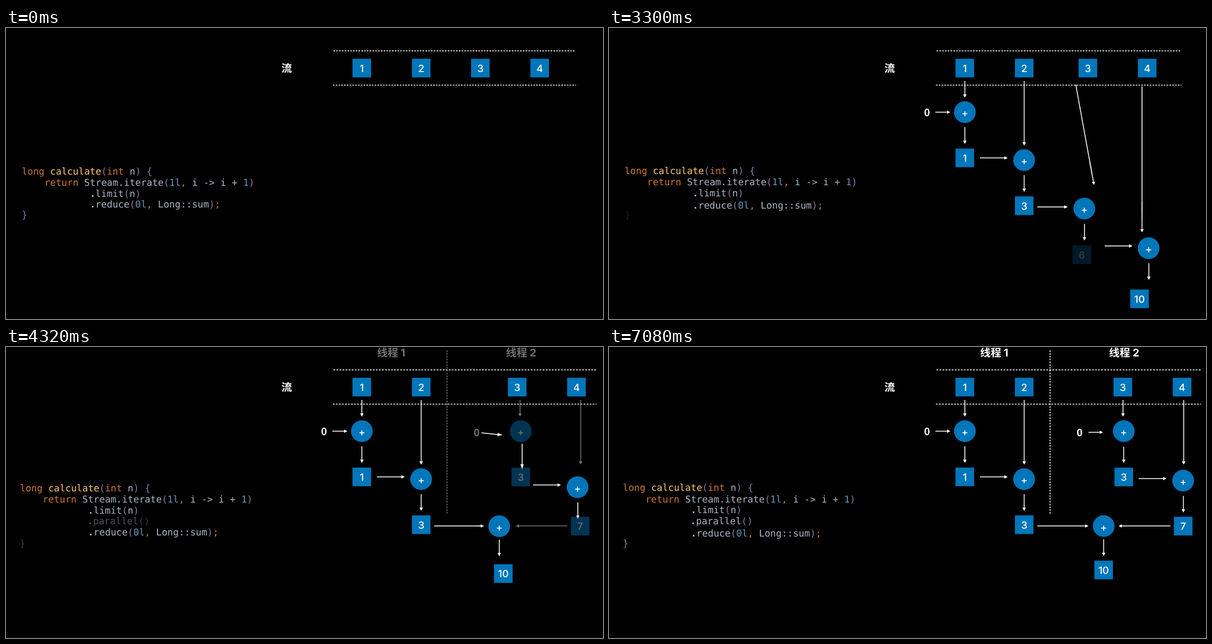
Animation of 1072 by 522 pixels, one loop 7.14 s. Source, as an HTML page:

```html
<!DOCTYPE html>
<html lang="zh">
<head>
<meta charset="utf-8">
<title>Stream reduce</title>
<style>
  html, body { margin: 0; width: 100%; height: 100%; overflow: hidden; background: #000; }
  svg { display: block; width: 100%; height: 100%; }
  text { white-space: pre; text-rendering: geometricPrecision; }
  .code { font: 16.93px "DejaVu Sans Mono", monospace; }
  .num { font: 500 18px Inter, sans-serif; fill: #fff; text-anchor: middle; }
  .bold { font: bold 19px "Liberation Sans", sans-serif; fill: #fff; text-anchor: middle; }
  .title { font: 700 19px Inter, "Noto Sans CJK SC", "Noto Sans CJK", sans-serif; fill: #fff; text-anchor: middle; }
  .dash { stroke: #fff; stroke-width: 1.5; }
</style>
</head>
<body>
<svg id="stage" viewBox="0 0 1072 522">
  <defs>
    <linearGradient id="edge" gradientUnits="userSpaceOnUse">
      <stop offset="0" stop-color="#fff"/>
      <stop offset="1" stop-color="#000"/>
    </linearGradient>
    <mask id="wipe" maskUnits="userSpaceOnUse" x="0" y="0" width="1072" height="522">
      <rect width="1072" height="522" fill="url(#edge)"/>
    </mask>
  </defs>
  <rect width="1072" height="522"/>
  <rect y="518" width="1072" height="4" fill="#070305"/>
</svg>
<script>
const LOOP = 7140, STEP = 60;
const MOVE_START = 2935, MOVE_TIME = 1660;
const SLANT = 0.49, SOFT = 120;
const BLUE = "#0076BA";

const stage = document.getElementById("stage");
const edge = document.getElementById("edge");

const clamp = v => Math.max(0, Math.min(1, v));
const mix = (a, b, p) => a + (b - a) * p;
const ease = v => (1 - Math.cos(Math.PI * clamp(v))) / 2;

function add(parent, tag, attrs = {}, text) {
  const el = document.createElementNS("http://www.w3.org/2000/svg", tag);
  for (const k in attrs) el.setAttribute(k, attrs[k]);
  if (text !== undefined) el.textContent = text;
  parent.appendChild(el);
  return el;
}

const base = add(stage, "g");
const graph = add(stage, "g");
const leavingCode = add(base, "g");
const leavingBox = add(graph, "g");
const entering = add(stage, "g");
const updates = [];   // functions of the move progress

// A group that travels from one point to another.
function mover(parent, x, y, x2 = x, y2 = y) {
  const g = add(parent, "g");
  updates.push(p => g.setAttribute("transform", `translate(${mix(x, x2, p)} ${mix(y, y2, p)})`));
  return g;
}

function box(parent, label, ...path) {
  const g = mover(parent, ...path);
  add(g, "rect", { x: -16.7, y: -16.7, width: 33.4, height: 33.4, fill: BLUE });
  add(g, "text", { class: "num", y: 7 }, label);
}

function plus(parent, ...path) {
  const g = mover(parent, ...path);
  add(g, "circle", { r: 19.5, fill: BLUE });
  add(g, "text", { class: "num", y: 8.2 }, "+");
}

const arrowPath = (len, head) =>
  `M0-.75H${len - head}V-3L${len} 0L${len - head} 3V.75H0Z`;

function measure([x1, y1, x2, y2]) {
  const dx = x2 - x1, dy = y2 - y1;
  return { x: (x1 + x2) / 2, y: (y1 + y2) / 2, len: Math.hypot(dx, dy), turn: Math.atan2(dy, dx) * 180 / Math.PI };
}

// An arrow that turns and stretches into another, blending the two heads.
function arrow(parent, from, to = from) {
  const a = measure(from), b = measure(to);
  const g = add(parent, "g", { fill: "#fff" });
  const before = add(g, "path"), after = add(g, "path");
  updates.push(p => {
    const len = mix(a.len, b.len, p);
    g.setAttribute("transform",
      `translate(${mix(a.x, b.x, p)} ${mix(a.y, b.y, p)}) rotate(${mix(a.turn, b.turn, p)}) translate(${-len / 2} 0)`);
    before.setAttribute("d", arrowPath(len, 6 * len / a.len));
    after.setAttribute("d", arrowPath(len, 6 * len / b.len));
    before.setAttribute("opacity", from === to ? 1 : clamp(2 * (1 - p)));
    after.setAttribute("opacity", from === to ? 0 : clamp(1.2 * p));
  });
}

function rail(x, y, end, end2) {
  const line = add(base, "line", { class: "dash", x1: x, y1: y, y2: y });
  updates.push(p => {
    const x2 = mix(end, end2, p), k = (x2 - x) / (end - x);
    line.setAttribute("x2", x2);
    line.setAttribute("stroke-dasharray", `${3 * k} ${2 * k}`);
  });
}

const syntax = [
  [/^(long|int|return|,|;)$/, "#CC7832"],
  [/^calculate$/, "#FFC66D"],
  [/^[(){}]$/, "#9176A3"],
  [/^\d/, "#6897BB"],
];

function code(parent, line, ...path) {
  const text = add(mover(parent, ...path), "text", { class: "code" });
  for (const word of line.match(/\w+|[(){},;]|[^\w(){},;]+/g)) {
    const rule = syntax.find(([re]) => re.test(word));
    const span = add(text, "tspan", { fill: rule ? rule[1] : "#A9B7C6" }, word);
    if (word === "." && line[0] === ".") span.setAttribute("font-weight", "bold");
  }
}

// Code
code(base, "long calculate(int n) {", 28.3, 262.5, 24.7, 258.3);
code(base, "return Stream.iterate(1l, i -> i + 1)", 69, 282.9, 65.4, 278.6);
code(base, ".limit(n)", 150.4, 302.7, 146.8, 298.4);
code(base, ".reduce(0l, Long::sum);", 150.4, 321.8, 146.9, 339.6);
code(leavingCode, "}", 28.3, 340.6);
code(entering, ".parallel()", 146, 318.1);
code(entering, "}", 24.7, 358.4);

// Stream row
add(base, "text", { class: "title", x: 504, y: 79 }, "流");
rail(588, 41, 1023, 1064.5);
rail(587, 102.4, 1023.5, 1063);
box(base, 1, 638.9, 71.9);
box(base, 2, 745.6, 71.9);
box(base, 3, 851.8, 71.9, 922.6, 71.9);
box(base, 4, 958.3, 71.9, 1029, 71.9);

// Sequential sums, which regroup into two halves
add(graph, "text", { class: "bold", x: 571, y: 158.3 }, "0");
arrow(graph, [586, 151, 613, 151]);
arrow(graph, [639, 95, 639, 125]);
plus(graph, 639, 151);
arrow(graph, [639, 178, 639, 208]);
box(graph, 1, 638.9, 233);
arrow(graph, [666, 233, 716, 233]);
arrow(graph, [745.5, 95, 745.5, 211]);
plus(graph, 745.4, 237);
arrow(graph, [745.5, 264, 745.5, 294]);
box(graph, 3, 745.6, 318.8);
arrow(graph, [769, 321, 819, 321], [769, 321, 861, 321]);
arrow(graph, [852, 95, 852, 298], [861, 153, 887, 153]);
plus(graph, 849, 324.3, 888.3, 321.3);
arrow(graph, [849.3, 352, 849.3, 382], [888.3, 345, 888.3, 375]);
arrow(graph, [882, 411, 932, 411], [951, 236, 1001, 236]);
arrow(graph, [961.4, 95, 961.4, 387], [924.3, 179, 924.3, 208]);
plus(graph, 961, 415, 1031, 239.8);
arrow(graph, [961.4, 442, 961.4, 472], [1031.4, 267, 1031.4, 297]);
box(graph, 10, 961, 497, 888.2, 400);
box(leavingBox, 6, 849, 406.8);

// Parallel parts
add(entering, "text", { class: "title", x: 691.5, y: 17 }, "线程 1");
add(entering, "text", { class: "title", x: 925, y: 17 }, "线程 2");
add(entering, "line", { class: "dash", x1: 792, y1: 6, x2: 792, y2: 299, "stroke-dasharray": "3 2" });
add(entering, "text", { class: "bold", x: 845, y: 160.3 }, "0");
arrow(entering, [923, 95, 923, 125]);
plus(entering, 924.3, 151);
box(entering, 3, 924.3, 233.2);
arrow(entering, [1032, 95, 1032, 211]);
box(entering, 7, 1031, 321.3);
arrow(entering, [1008, 321, 915, 321]);

// The wipe runs, rests, then finishes.
function wipeFront(t) {
  const run = Math.min(t, 1140) - 780 + Math.max(0, t - 1260);
  return 431 + 1.1 * run;
}

function draw(t) {
  const p = ease((t - MOVE_START) / MOVE_TIME);
  for (const update of updates) update(p);

  const front = wipeFront(t) - SOFT, k = SOFT / (1 + SLANT * SLANT);
  edge.setAttribute("x1", 0);
  edge.setAttribute("y1", front);
  edge.setAttribute("x2", k * SLANT);
  edge.setAttribute("y2", front + k);
  graph.setAttribute("visibility", t < 780 ? "hidden" : "visible");
  if (t < 1620) graph.setAttribute("mask", "url(#wipe)");
  else graph.removeAttribute("mask");

  const left = 1 - clamp((t - 2880) / 540);
  leavingCode.setAttribute("opacity", left);
  leavingBox.setAttribute("opacity", left);
  entering.setAttribute("opacity", clamp((t - 4100) / 500));
}

const began = performance.now();
function tick() {
  const t = (performance.now() - began) % LOOP;
  draw(Math.floor(t / STEP) * STEP);
  requestAnimationFrame(tick);
}
tick();
</script>
</body>
</html>
```
